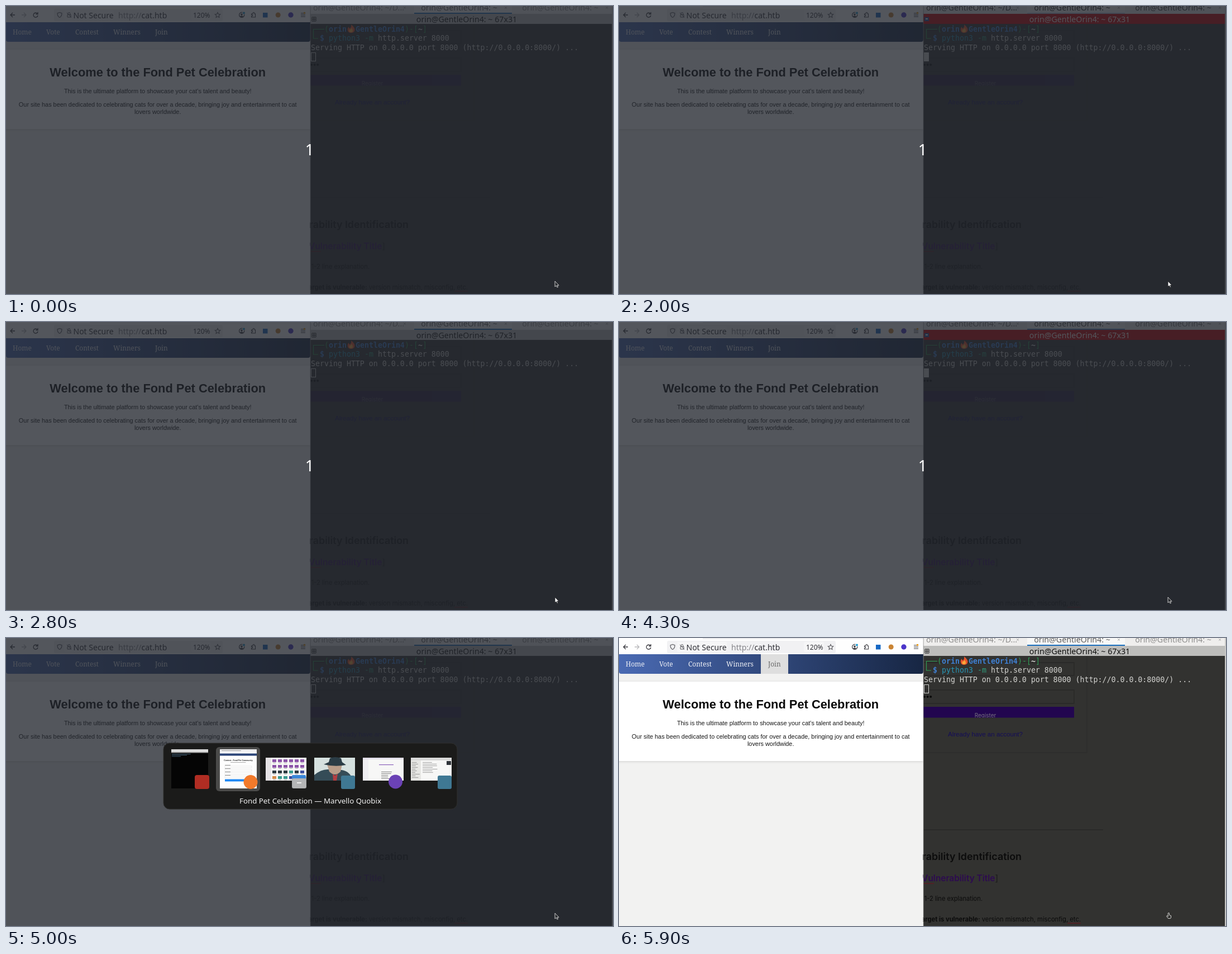
These frames come from a looping animation (1087 px wide and 515 px high, 8000 ms). An HTML page:

```html
<!DOCTYPE html>
<html lang="en">
<head>
<meta charset="utf-8">
<title>Desktop</title>
<style>
html, body { margin: 0; width: 100%; height: 100%; overflow: hidden; background: #f2f2f1; }
svg { display: block; width: 1087px; height: 515px; }
text { white-space: pre; }
.ui { font-family: "Noto Sans", sans-serif; }
.serif { font-family: "Noto Serif", serif; }
.page { font-family: "Liberation Sans", Arial, sans-serif; }
.mono { font-family: "DejaVu Sans Mono", monospace; }
.note { font-family: Inter, sans-serif; }
</style>
</head>
<body>
<svg id="stage" viewBox="0 0 1087 515" xmlns="http://www.w3.org/2000/svg"></svg>
<script>
const LOOP = 8000;
const USER = 'orin', HOST = 'GentleOrin4', EVENT = 'Fond Pet Celebration';
const WHO = `${USER}@${HOST}: ~`;

const rect = (x, y, w, h, fill, more = '') =>
  `<rect x="${x}" y="${y}" width="${w}" height="${h}" fill="${fill}" ${more}/>`;
const text = (cls, x, y, size, fill, s, more = '') =>
  `<text class="${cls}" x="${x}" y="${y}" font-size="${size}" fill="${fill}" ${more}>${s}</text>`;
const line = (d, color, w = 1.3, more = '') =>
  `<path d="${d}" fill="none" stroke="${color}" stroke-width="${w}" ${more}/>`;
const shape = (d, fill, more = '') => `<path d="${d}" fill="${fill}" ${more}/>`;
const dot = (x, y, r, fill) => `<circle cx="${x}" cy="${y}" r="${r}" fill="${fill}"/>`;
const group = (id, body, more = '') => `<g id="${id}" ${more}>${body}</g>`;
const repeat = (n, fn) => Array.from({ length: n }, (_, i) => fn(i)).join('');
const MID = ' text-anchor="middle"', END = ' text-anchor="end"';
const BOLD = ' font-weight="700"', SEMI = ' font-weight="600"';

function toolbar() {
  const ink = '#3a3a40';
  return rect(0, 0, 545, 29, '#fefefe') + rect(150, 0, 395, 2, '#ececee') +
    rect(86, 5, 302, 22, '#f1f1f3', 'rx="3"') + rect(104, 7, 89, 18, '#f6f6f7', 'rx="3"') +
    rect(331, 7, 36, 18, '#f6f6f7', 'rx="3"') +
    line('M16 16H8M12 12L8 16L12 20', ink) +
    line('M28 16H36M32 12L36 16L32 20', '#b9b9bc') +
    line('M56 13.5A4 4 0 1 0 57 17M57 11V14.5H53.5', ink) +
    line('M96 11.5L100 13C100 17 99 19 96 20.5C93 19 92 17 92 13Z', '#55555a', 1.1) +
    line('M110 15.5H116V20H110ZM111.2 15.5V13.5A1.8 1.8 0 0 1 114.8 13.5V15.5M109 12L117 20.5', '#55555a', 1) +
    text('ui', 120.5, 21.5, 14, '#303036', 'Not Secure') +
    text('ui', 201, 21.5, 14, '#303036', '<tspan fill="#85858a">http://</tspan>cat.htb') +
    text('ui', 335, 20.5, 12, '#303036', '120%') +
    line('M379 11.5L380.4 14.6L383.7 15L381.2 17.2L381.9 20.5L379 18.8L376.1 20.5L376.8 17.2L374.3 15L377.6 14.6Z', '#55555a', 1.1) +
    line('M426.7 14.8A4.6 4.6 0 1 1 423.3 11.4', ink, 1.2) + dot(422, 15, 1.8, ink) +
    shape('M418.8 19Q422 15.5 425.2 19Q422 21 418.8 19', ink) + dot(426, 12.5, 2, '#1c9bd1') +
    line('M439.5 14H442V13A1.5 1.5 0 0 1 445 13V14H446.5V20H439.5V18H441A1.2 1.2 0 0 0 441 15.8H439.5Z', ink, 1.1) +
    rect(460, 12, 8.5, 8.5, '#1668c4') + dot(487.2, 16, 4.5, '#c98332') + dot(510, 16, 4.7, '#4b35c9') +
    line('M528 13H536M528 16H536M528 19H536', ink, 1.1) +
    group('badge', dot(534.5, 12.5, 1.8, '#e59a1c'));
}

function website() {
  const links = [['Home', 12], ['Vote', 72], ['Contest', 124], ['Winners', 192], ['Join', 267]];
  const body = (y, s) => text('page', 271.7, y, 10.9, '#161616', s, MID);
  return rect(0, 29, 545, 486, '#f2f2f1') +
    shape('M0 29H545V60Q545 64 541 64H4Q0 64 0 60Z', 'url(#nav)') +
    group('hover', rect(254, 29, 49, 35, '#dedede')) +
    links.map(([s, x], i) =>
      text('serif', x, 51, 11.9, '#f0f2f6', s, i == 4 ? 'id="join"' : '')).join('') +
    rect(-4, 78, 549, 142, '#fff', 'filter="url(#soft)"') +
    text('page', 271.7, 126, 21.85, '#0a0a0a', `Welcome to the ${EVENT}`, MID + BOLD) +
    body(156, "This is the ultimate platform to showcase your cat's talent and beauty!") +
    body(180, 'Our site has been dedicated to celebrating cats for over a decade, bringing joy and entertainment to cat') +
    body(193, 'lovers worldwide.');
}

function backdrop() {
  const ink = '#0c0c0c';
  const boxes = line('M838 32V205H545', '#2e2e2c', 1.5) +
    line('M545 44H815V67H545M545 93H815V117H545M545 343H867', '#282827') +
    rect(545, 123, 270, 19.5, '#22064f') +
    `<g clip-path="url(#button)">${text('note', 656, 142, 10, '#77727f', 'Register', MID)}</g>`;
  return rect(545, 32, 540, 483, '#323230') + group('boxes', boxes) +
    repeat(3, i => dot(547 + i * 5.6, 105, 2, '#080808')) +
    text('page', 656, 176, 11.6, '#140d58', 'Already have an account?', MID) +
    text('note', 721, 397, 17.9, ink, 'Vulnerability Identification', END + SEMI) +
    text('note', 679, 435, 15.4, '#2d0b50', 'Vulnerability Title<tspan fill="#1b1b1b" font-weight="400">]</tspan>', END + SEMI) +
    line('M545 439H564M803 510H827', '#5a1c22') +
    text('note', 651, 470, 11.1, ink, '1-2 line explanation.', END) +
    text('note', 827, 507, 11.2, ink, '<tspan font-weight="700">Target is vulnerable:</tspan> version mismatch, misconfig, etc.', END);
}

function shell() {
  const row = (x, y, fill, s, more = '') => text('mono', x, y, 13.27, fill, s, more);
  const green = '#2f9d55', blue = '#3f7fd0', pale = '#d2d2cf';
  return line('M570 41.5H550.5V58H559', green, 1.2) +
    row(570, 46, green, '(') + row(578, 46, blue, USER, BOLD) +
    shape('M618 33C623 37 625.5 41 624 45Q622 48 618 48Q613 48 612 44Q611 40 614 37Q614 40 616 40Q619 37 618 33', '#e9542b') +
    shape('M618.5 39C622 43 622 47 618 47C614 47 613.5 43.5 616 41.5Q618 43 618.5 39', '#f8a83a') +
    row(626, 46, blue, HOST, BOLD) + row(714, 46, green, ')-[') +
    row(738, 46, pale, '~', BOLD) + row(746, 46, green, ']') +
    row(562, 62, blue, '$', BOLD) + row(578, 62, '#2794b4', 'python3') +
    row(642, 62, '#2f9d7c', '-m') + row(666, 62, pale, 'http.server 8000') +
    row(546, 79, pale, 'Serving HTTP on 0.0.0.0 port 8000 (http://0.0.0.0:8000/) ...') +
    rect(546.5, 83.5, 8, 15, 'none', `id="caret" stroke="${pale}"`);
}

function terminal() {
  const tab = (x, s) => text('ui', x, 8, 14.2, '#000', s, MID);
  const title = fill => text('ui', 825, 28.5, 14.2, fill, `${WHO} 67x31`, MID);
  const cross = x => line(`M${x - 2} 1L${x + 2} 5M${x + 2} 1L${x - 2} 5`, '#b2b2b2', 1);
  return backdrop() + rect(545, 0, 540, 14, '#efeeed') +
    rect(731, 0, 175, 14, '#f8f8f7') +
    group('tabs', tab(631.5, `${USER}@${HOST}: ~/D...`) + tab(992.5, WHO)) +
    group('tab', tab(811.5, WHO)) + cross(714) + cross(895) + cross(1076) +
    rect(731, 12, 175, 2, '#1b6fbd', 'id="mark"') +
    group('idle', rect(545, 14, 540, 18, '#bdbdbb') + title('#0c0c0c') +
      line('M548 20H555V27H548ZM548 23.5H555M551.5 20V27', '#222', 1)) +
    group('active', rect(545, 14, 540, 18, '#c80003') + title('#fff') +
      rect(547, 20, 8, 7, '#1f4f9a') + rect(549, 22, 4, 2, '#fff')) +
    shell() + rect(544.5, 0, 1, 515, '#8d8d8b') + rect(1085, 0, 2, 515, '#c9c9c7');
}

function thumbs() {
  const rnd = (n => () => (n = n * 16807 % 2147483647) / 2147483647)(77);
  const lines = (x, y, n, w, gap, fill) =>
    repeat(n, i => rect(x, y + i * gap, w * (.4 + .6 * rnd()), .8, fill));
  const white = x => rect(x, 214, 73, 41, '#f7f7f6');
  const cube = x => rect(x, 246, 25, 24, '#3f7893', 'rx="3"');
  const files = white(465) + rect(465, 214, 10, 41, '#e6e3e6') + repeat(24, i => {
    const r = Math.floor(i / 6), x = 477 + i % 6 * 10, y = 217 + r * 10;
    const hue = r < 2 ? '#8c55a8' : ['#2b3940', '#399b90', '#d48b49', '#3c4e9e'][Math.floor(rnd() * 4)];
    return rect(x, y, 7, 5, hue) + rect(x + 1, y + 6.2, 5, .7, '#888');
  });
  const figure = rect(552, 214, 73, 41, '#d6e1df') +
    shape('M552 255V245Q565 234 578 235L601 236Q616 238 622 255Z', '#354c57') +
    shape('M575 226H602L599 239Q589 249 579 239Z', '#b89d89') +
    shape('M569 226L578 222L580 215Q589 211 600 215L602 222L609 227Q589 231 569 226', '#2b3d46') +
    shape('M585 243L589 246L594 243L592 255H586Z', '#b23f43');
  return rect(296, 199, 66, 70, '#050505') + rect(296, 199, 66, 5, '#dcdcdc') +
    rect(296, 204, 66, 1.5, '#9a9a9a') + lines(297, 207, 3, 34, 2.2, '#4d6e88') +
    rect(338, 245, 26, 25, '#b02d23', 'rx="4"') +
    rect(383, 199, 66, 70, '#fdfdfd') + rect(383, 199, 66, 4, '#ececee') +
    lines(386, 201, 1, 40, 1, '#888') + rect(383, 206.5, 66, 4, '#2c4679') +
    text('page', 416, 219.5, 3.5, '#222', 'Contest - Fond Pet Community', MID + BOLD) +
    lines(402, 222, 1, 34, 1, '#999') +
    repeat(4, i => rect(392, 227 + i * 6, 10, .8, '#777') +
      rect(392, 229 + i * 6, 48, 3, '#fff', 'stroke="#d5d5d5" stroke-width=".5"')) +
    rect(392, 252.5, 48, 4, '#1d87f3') + dot(438, 257.5, 12.5, '#f27a2b') +
    files + rect(512, 247, 26, 22, '#a7a9aa', 'rx="3"') + rect(512, 245, 25, 7, '#3a86d8', 'rx="2"') +
    rect(513, 251, 24, 17, '#b4b5b6', 'rx="2"') + rect(521, 258, 8, 2, '#eee') +
    figure + cube(600) +
    white(639) + rect(639, 214, 73, 3, '#e3dfe9') + rect(639, 217, 10, 38, '#f0eff2') +
    rect(668, 226, 26, 1.2, '#8a61bb') + lines(672, 239, 5, 25, 3, '#666') +
    dot(697.5, 257, 12.5, '#6b42b5') +
    white(725) + rect(725, 214, 73, 5, '#d9d9d9') + rect(725, 219, 18, 36, '#e6e6e3') +
    lines(727, 222, 10, 14, 3, '#858585') + lines(746, 222, 7, 32, 3, '#8d8d8d') +
    rect(789, 220, 8, 7, '#30343a') + cube(773);
}

function switcher() {
  return rect(282, 188, 526, 118, '#1b1b1a', 'rx="11" stroke="#30302f"') +
    rect(376, 195, 79, 79, '#4a4a49', 'rx="6"') + thumbs() +
    text('ui', 545, 295.5, 13.3, '#f2f2f2', `${EVENT} — Marvello Quobix`, MID);
}

const stage = document.getElementById('stage');
stage.innerHTML = `<defs>
  <linearGradient id="nav"><stop stop-color="#4a6ab3"/><stop offset="1" stop-color="#172643"/></linearGradient>
  <filter id="soft" x="-5%" y="-10%" width="110%" height="120%"><feDropShadow dx="0" dy="1" stdDeviation="2" flood-opacity=".14"/></filter>
  <clipPath id="left"><rect width="545" height="515"/></clipPath>
  <clipPath id="right"><rect x="544.5" width="543" height="515"/></clipPath>
  <clipPath id="button"><rect x="545" y="123" width="270" height="19"/></clipPath></defs>` +
  group('browser', website() + toolbar(), 'clip-path="url(#left)"') +
  group('term', terminal(), 'clip-path="url(#right)"') +
  group('dim', rect(0, 0, 1087, 515, '#23272f', 'opacity=".78"') +
    text('ui', 543.5, 267, 27.5, '#fff', '1', MID)) +
  group('switcher', switcher()) +
  group('arrow', shape('M983 492V502L985.4 500L987 503.2L988.6 502.4L987 499.4H990Z', '#fff', 'id="tip" stroke-width=".9"')) +
  group('hand', shape('M984 491.5Q985.5 491 985.5 493V495.5L988.5 496.5V500L987.5 501.5H983.5L980.5 497.5Q980.8 496 982.3 497L983.2 498V492Z', '#343432', 'stroke="#e2e2e0" stroke-width=".9"'));

const el = Object.fromEntries([...stage.querySelectorAll('[id]')].map(n => [n.id, n]));
const show = (node, on) => node.setAttribute('display', on ? 'inline' : 'none');
const set = (node, k, v) => node.setAttribute(k, v);
const ramp = (t, from, len) => Math.max(0, Math.min(1, (Math.floor((t - from) / 100) + 1) * 100 / len));

function draw(t) {
  const dimmed = t < 5700;
  const focused = t >= 1700 && t < 2500 || t >= 4300 && t < 4800;
  const glow = t < 2500 ? ramp(t, 1700, 400) : t < 4300 ? 1 - ramp(t, 2500, 400)
    : t < 4800 ? ramp(t, 4300, 300) : 1 - ramp(t, 4800, 300);
  const hover = ramp(t, 5800, 200);
  const filled = t >= 100 && t < 4300;

  show(el.dim, dimmed);
  set(el.boxes, 'opacity', dimmed ? .45 : 1);
  show(el.active, focused);
  show(el.idle, !focused);
  show(el.switcher, t >= 4800 && t < 5800);
  show(el.badge, t < 200 || t >= 1300);
  set(el.tabs, 'opacity', .4 + .4 * glow);
  set(el.tab, 'opacity', .62 + .3 * glow);
  set(el.mark, 'opacity', 1 - .7 * glow);
  set(el.caret, 'fill', focused ? '#d2d2cf' : 'none');
  set(el.hover, 'opacity', hover);
  set(el.join, 'fill', hover < .5 ? '#f0f2f6' : '#686868');
  show(el.arrow, t < 5800);
  show(el.hand, t >= 5800);
  set(el.tip, 'fill', filled ? '#fff' : '#2a2c30');
  set(el.tip, 'stroke', filled ? '#1c1e22' : '#d8d8d8');
}

const start = performance.now();
function tick() {
  draw((performance.now() - start) % LOOP);
  requestAnimationFrame(tick);
}
tick();
</script>
</body>
</html>
```
